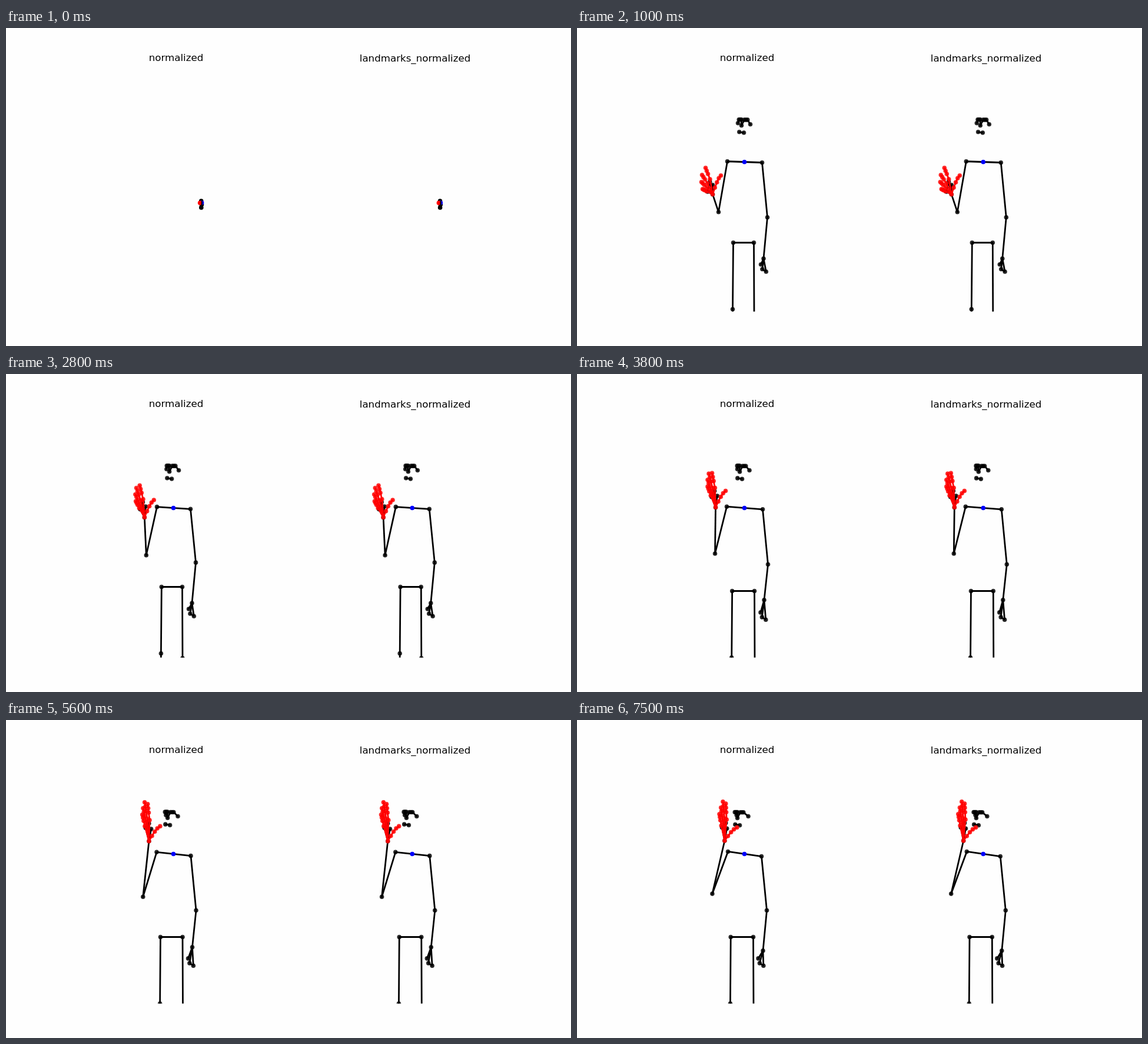
Write an HTML page with a canvas that moves like this. It is 960 by 540 pixels and loops after 8000 ms.

```html
<!DOCTYPE html>
<html lang="en">
<head>
<meta charset="utf-8">
<title>Normalized landmarks</title>
<style>
  html, body { margin: 0; width: 100%; height: 100%; overflow: hidden; background: #fefefe; }
  canvas, svg { position: absolute; left: 0; top: 0; width: 960px; height: 540px; }
  text { font: 16.67px "DejaVu Sans", sans-serif; text-anchor: middle; fill: #000; }
</style>
</head>
<body>
<canvas id="stage" width="960" height="540"></canvas>
<svg viewBox="0 0 960 540">
  <text x="289" y="56">normalized</text>
  <text x="695" y="57">landmarks_normalized</text>
</svg>
<script>
const ctx = document.getElementById('stage').getContext('2d');
const LOOP = 8000, PANEL_GAP = 405.8, FLOOR = 481.5;
const RAISE_START = 1000, RAISE_TIME = 5600;

// The arm rises steadily; the rest of the body only sways a little at each step.
const steps = [
  { start: 100, drop: 0, width: 0, lift: 0 },
  { start: 1000, drop: 0, width: 0, lift: 0 },
  { start: 1900, drop: -3, width: -1, lift: 0 },
  { start: 2800, drop: -3, width: -1, lift: 0 },
  { start: 3800, drop: 4, width: 1, lift: 11 },
  { start: 4700, drop: 4, width: 0, lift: 10 },
  { start: 5600, drop: 4, width: -0.5, lift: 9 },
  { start: 6600, drop: 11, width: 0.5, lift: 0 },
  { start: 7500, drop: 4, width: -1, lift: 3 }
];

// Fingertips relative to the wrist, with the arm low and high
const fingers = [
  { low: [-12, -45], high: [0, -64], bend: 2.3 },
  { low: [-18, -33], high: [-5, -68], bend: 1.5 },
  { low: [-19, -21], high: [-8, -58], bend: 0.7 },
  { low: [-17, -9], high: [-10, -47], bend: -0.6 }
];
const FINGER_JOINTS = [0.57, 0.77, 0.89, 1];
const THUMB_JOINTS = [0.27, 0.52, 0.75, 1];

const mix = (a, b, k) => a + (b - a) * k;
const add = ([x, y], dx, dy) => [x + dx, y + dy];
const row = (p, offsets, dy) => offsets.map(dx => add(p, dx, dy));

function makeHand(u, width) {
  const rise = 1 - Math.abs(1 - u) ** 1.7;
  const wrist = [230 + 15.5 * u * (0.6 + 0.4 * u) - 1.2 * width, mix(282, 201, rise)];
  const tips = fingers.map(f => [mix(f.low[0], f.high[0], u), mix(f.low[1], f.high[1], rise)]);
  const chains = fingers.map((f, i) => FINGER_JOINTS.map(k =>
    add(wrist, tips[i][0] * k + f.bend * (1 - k) / 0.43, tips[i][1] * k)));
  const thumbTip = [mix(14, 20, u), mix(-32, -24, u)];
  const thumb = THUMB_JOINTS.map(k =>
    add(wrist, thumbTip[0] * k, thumbTip[1] * (1 - (1 - k) ** 1.4)));
  return {
    wrist,
    chains: [thumb, ...chains],
    // coarse hand of the body model
    index: add(wrist, tips[0][0] * 0.48 + 1, tips[0][1] * 0.48),
    pinky: add(wrist, tips[3][0] * 0.5, tips[3][1] * 0.5),
    thumb: add(wrist, mix(0, 4, rise), mix(-16, -21, rise))
  };
}

function line(points) {
  ctx.beginPath();
  points.forEach(p => ctx.lineTo(...p));
  ctx.stroke();
}

function dot([x, y], alpha = 0.75) {
  ctx.globalAlpha = alpha;
  ctx.lineWidth = 1.39;
  ctx.beginPath();
  ctx.arc(x, y, 3.1, 0, 2 * Math.PI);
  ctx.fill();
  ctx.stroke();
  ctx.globalAlpha = 1;
}

function solidDot(color, point) {
  ctx.fillStyle = ctx.strokeStyle = color;
  dot(point, 1);
}

function graph(color, chains) {
  ctx.strokeStyle = ctx.fillStyle = color;
  ctx.lineWidth = 2.78;
  ctx.lineCap = 'square';
  ctx.lineJoin = 'round';
  chains.forEach(line);
  // shared joints get one dot only
  new Set(chains.flat()).forEach(p => dot(p));
}

function drawBody(u, { drop, width, lift }, hand) {
  const nose = [279 - 6 * u, 165 + 0.8 * u];
  const eyeL = row(nose, [5, 7.7, 10.3], -9.6);
  const eyeR = row(nose, [-0.3, -2.3, -4.3], -10);
  const earL = [294 - 3 * u, 163], earR = [273 - 2 * u, 161];

  const tilt = 1 + 2.6 * u;
  const shoulderR = [255 - width, 227 - tilt], shoulderL = [314 + width, 227 + tilt];
  const elbowR = [240 - 10 * u - width, 312 - 15 * u];
  const elbowL = [323 + width, 321 + 0.45 * drop];
  const wristL = [316.5 + width, 391 + 0.8 * drop - lift];
  const thumbL = [312 - 3 * u + width, 401 + 0.85 * drop];
  const indexL = add(thumbL, 2.4, 8), pinkyL = add(thumbL, 8.8, 12.3);

  const hipR = [265 - 3.7 * u, 364 + drop], hipL = [300 + width, 364 + drop];
  const kneeR = [264 - 3.5 * u, 477 + drop], kneeL = [300.5 + width, 485 + drop];

  graph('#000', [
    [nose, ...eyeL, earL],
    [nose, ...eyeR, earR],
    [add(nose, 4, 12.3), add(nose, -3.7, 11)],
    [elbowR, shoulderR, shoulderL, elbowL, wristL],
    [elbowR, hand.wrist],
    [thumbL, wristL, indexL, pinkyL, wristL],
    [hand.thumb, hand.wrist, hand.index, hand.pinky, hand.wrist],
    [add(kneeR, 0, 60), kneeR, hipR, hipL, kneeL, add(kneeL, 0, 60)]
  ]);
}

function drawCollapsed() {
  solidDot('#000', [331.2, 293.2]);
  solidDot('#000', [332, 299.2]);
  solidDot('#00f', [332.1, 296.2]);
  solidDot('#f00', [329.1, 296.5]);
  ctx.strokeStyle = '#000';
  ctx.lineWidth = 2;
  line([[332.3, 293], [332, 304]]);
  solidDot('#000', [331.3, 304.4]);
}

function drawPanel(step) {
  if (!step) return drawCollapsed();
  const u = (step.start - RAISE_START) / RAISE_TIME;
  const hand = makeHand(u, step.width);
  drawBody(u, step, hand);
  solidDot('#00f', [284, 227]);
  graph('#f00', hand.chains.map(chain => [hand.wrist, ...chain]));
}

function frame() {
  const t = performance.now() % LOOP;
  const step = steps.filter(s => s.start <= t).pop();
  ctx.clearRect(0, 0, 960, 540);
  for (const x of [0, PANEL_GAP]) {
    ctx.save();
    ctx.beginPath();
    ctx.rect(0, 0, 960, FLOOR);
    ctx.clip();
    ctx.translate(x + 0.5, 0.5);
    drawPanel(step);
    ctx.restore();
  }
  requestAnimationFrame(frame);
}
frame();
</script>
</body>
</html>
```
